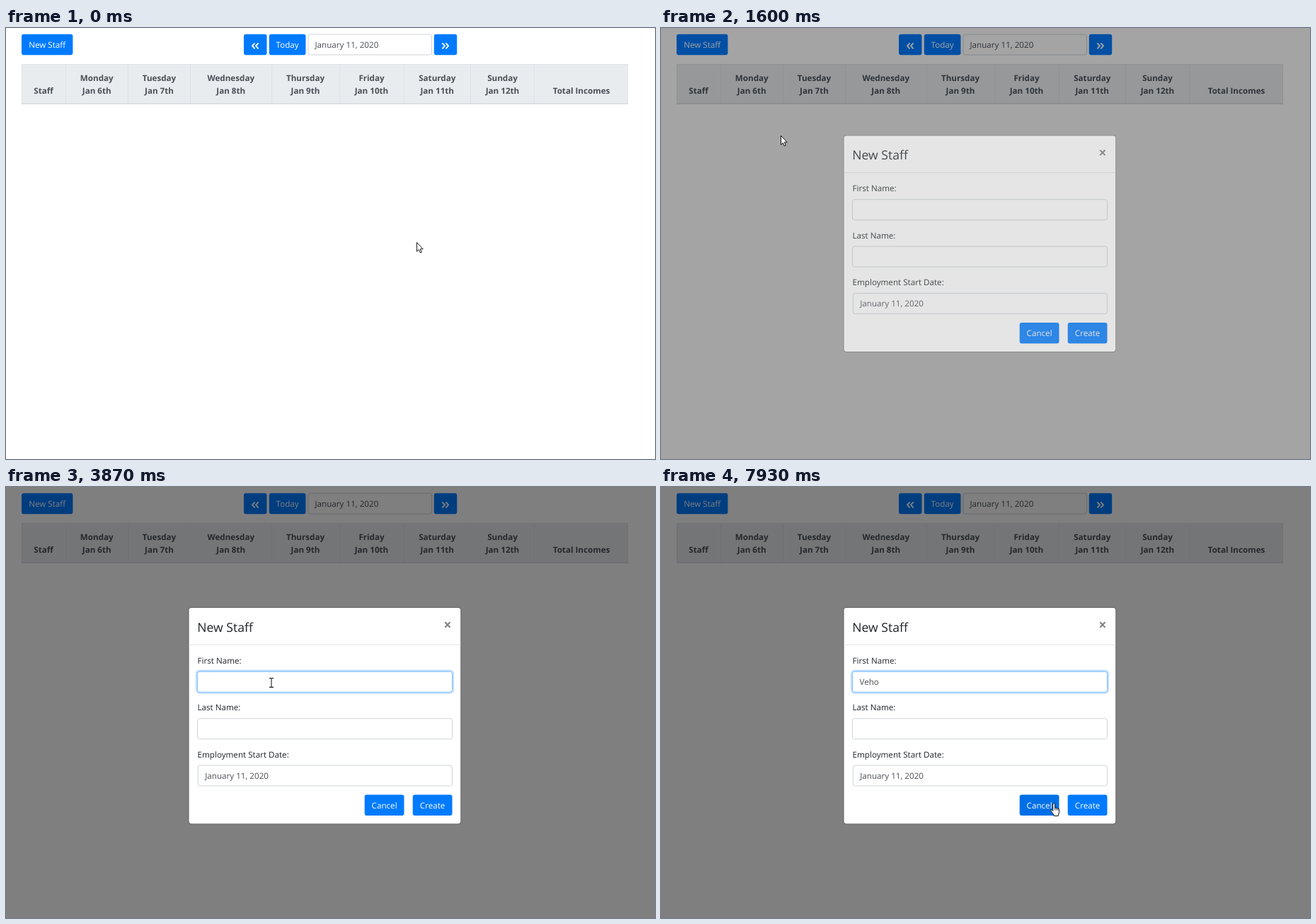
An HTML page that plays this animation: 917 px wide and 610 px high, repeating every 8000 ms.

```html
<!DOCTYPE html>
<html lang="en">
<head>
<meta charset="utf-8">
<title>Staff planner</title>
<style>
  html, body { margin: 0; width: 100%; height: 100%; overflow: hidden; background: #fff; }
  svg { display: block; width: 917px; height: 610px; }
  text { font: 11.65px "Open Sans", "Noto Sans", sans-serif; text-rendering: geometricPrecision; }
  .head { font-weight: 700; fill: #495057; text-anchor: middle; }
  .label { fill: #212529; }
  .title { font-size: 17.6px; fill: #212529; }
  .value { fill: #495057; }
  .btn { fill: #fff; text-anchor: middle; }
</style>
</head>
<body>
<svg id="stage" viewBox="0 0 917 610" xmlns="http://www.w3.org/2000/svg"></svg>
<script>
const LOOP = 8000, STEP = 1000 / 15;
const BLUE = [0, 123, 255], HOVER = [0, 105, 217], PRESSED = [0, 100, 210];
const NAME = 'Veho';
const KEY_TIMES = [5130, 5730, 5930, 6330];

const label = (cls, x, y, s) => `<text class="${cls}" x="${x}" y="${y}">${s}</text>`;

const button = (id, x, y, w, s = '') =>
  `<rect id="${id}" x="${x}" y="${y}" width="${w}" height="29.4" rx="3" fill="#007bff"/>` +
  label('btn', x + w / 2, y + 19.1, s);

const field = (id, x, y, w) =>
  `<rect id="${id}" x="${x}" y="${y}" width="${w}" height="29" rx="3" fill="#fff" stroke="#ced4da"/>`;

const chevrons = (x, dir) => [0, 5].map(d =>
  `<path d="M${x + dir * d} 21.3l${-dir * 3.6} 4 ${dir * 3.6} 4" fill="none" stroke="#fff" stroke-width="1.9"/>`).join('');

function header() {
  const edges = [22, 84, 172.5, 260.5, 375, 471, 562, 656.5, 746.5, 879];
  const days = ['Monday', 'Tuesday', 'Wednesday', 'Thursday', 'Friday', 'Saturday', 'Sunday'];
  let out = '<rect x="22" y="51" width="857" height="57" fill="#e9ecef"/>';
  for (const x of edges) {
    out += `<path d="M${Math.min(Math.floor(x), 878) + .5} 51V108" stroke="#dee2e6"/>`;
  }
  out += '<path d="M22 51.5H879" stroke="#dee2e6"/><path d="M22 107.3H879" stroke="#d6dbe0" stroke-width="1.4"/>';
  out += label('head', 53, 93.3, 'Staff') + label('head', 813, 93.3, 'Total Incomes');
  days.forEach((day, i) => {
    const x = (edges[i + 1] + edges[i + 2]) / 2;
    out += label('head', x, 75, day) + label('head', x, 93.3, `Jan ${i + 6}th`);
  });
  return out;
}

const toolbar = () =>
  button('newBtn', 22, 8.8, 72.4, 'New Staff') +
  button('prev', 336, 8.8, 32.5) + chevrons(351.6, 1) +
  button('today', 371.8, 8.8, 51.7, 'Today') +
  field('day', 427, 9, 174.5) + label('value', 436.5, 28, 'January 11, 2020') +
  button('next', 604.8, 8.8, 32.4) + chevrons(621.4, -1);

const dialog = () =>
  `<rect x="257.7" y="170.2" width="385.4" height="307" rx="4" fill="#000" fill-opacity=".3"/>
  <rect x="258.5" y="171" width="383.8" height="305.5" rx="3.4" fill="#fff"/>
  <path d="M258.5 223.3H642.3" stroke="#e4e7ea"/>
  <path d="M620.3 191.3l7.2 7.4m0-7.4l-7.2 7.4" stroke="#7f7f7f" stroke-width="2"/>` +
  label('title', 270.3, 204.5, 'New Staff') +
  label('label', 270.5, 250, 'First Name:') +
  label('label', 270.5, 316.4, 'Last Name:') +
  label('label', 270.5, 382.8, 'Employment Start Date:') +
  '<rect id="ring" x="269.2" y="259.9" width="362.6" height="31.6" rx="4.5" fill="none" stroke="#007bff" stroke-width="2.5"/>' +
  field('first', 270.5, 261.3, 360) + field('last', 270.5, 327.7, 360) + field('start', 271.3, 394, 359) +
  '<text id="typed" class="value" x="280.5" y="280"></text>' +
  '<rect id="caret" y="267" width="1" height="16" fill="#495057"/>' +
  label('value', 281.2, 413, 'January 11, 2020') +
  button('cancel', 506.7, 435.6, 55.8, 'Cancel') + button('create', 574.7, 435.6, 55.8, 'Create');

const pointers = () =>
  `<g id="arrow"><path d="M.5.5V13.2L3.4 10.5 5.3 15 7.3 14.2 5.4 9.8H9.2Z" fill="#fff" stroke="#000" stroke-width=".9"/></g>
  <g id="hand"><path d="M-1.2 11.5V2A1.4 1.4 0 0 1 1.6 2V7.2Q3 6.2 3.8 7.6 5.2 6.8 5.8 8.4 7.6 7.8 7.6 9.8V13Q7.6 15 6.4 16.4V18.5H0V16.8L-3.8 11.9Q-4.7 10-3.2 9.6-2.2 9.6-1.2 11.5Z" fill="#fff" stroke="#000" stroke-width=".9"/>
  <path d="M1.6 7V10.5M3.8 7.8V10.5M5.8 8.6V10.8" stroke="#000" stroke-width=".8"/></g>
  <g id="beam"><path d="M-3-6.4H-1Q0-6.4 0-5.4 0-6.4 1-6.4H3M-3 6.4H-1Q0 6.4 0 5.4 0 6.4 1 6.4H3M0-5.5V5.5" fill="none" stroke="#222" stroke-width="1.1"/></g>`;

const stage = document.getElementById('stage');
stage.innerHTML = '<rect width="917" height="610" fill="#fff"/>' + toolbar() + header() +
  '<rect id="shade" width="917" height="610"/>' +
  `<g id="modal">${dialog()}</g>` + pointers();

const el = {};
stage.querySelectorAll('[id]').forEach(n => el[n.id] = n);
const set = (id, name, v) => el[id].setAttribute(name, v);

const clamp = v => Math.max(0, Math.min(1, v));
const mix = (a, b, p) => `rgb(${a.map((v, i) => Math.round(v + (b[i] - v) * p))})`;

// Linear interpolation over rows of [time, ...values].
function track(rows, t) {
  if (t <= rows[0][0]) return rows[0].slice(1);
  for (let i = 1; i < rows.length; i++) {
    const a = rows[i - 1], b = rows[i];
    if (t <= b[0]) {
      const p = (t - a[0]) / (b[0] - a[0]);
      return a.slice(1).map((v, j) => v + (b[j + 1] - v) * p);
    }
  }
  return rows[rows.length - 1].slice(1);
}

// CSS ease-out, cubic-bezier(0, 0, .58, 1).
function easeOut(p) {
  let lo = 0, hi = 1;
  for (let i = 0; i < 20; i++) {
    const s = (lo + hi) / 2;
    if (1.74 * s * s - .74 * s ** 3 < p) lo = s; else hi = s;
  }
  return 3 * lo * lo - 2 * lo ** 3;
}

const MOUSE = [
  [0, 580, 303], [130, 566, 313], [270, 505, 285], [400, 400, 215], [530, 270, 130],
  [670, 140, 55], [730, 92, 34], [870, 63, 22], [1000, 65, 21], [1470, 65, 21],
  [1530, 108, 82], [1600, 169, 152], [1670, 231, 195], [1800, 325, 248], [1930, 368, 272],
  [2000, 375, 276.5], [7270, 375, 276.5], [7330, 379, 280], [7470, 405, 310], [7600, 465, 385],
  [7670, 500, 425], [7730, 528, 455], [7800, 545, 466], [7870, 553, 453], [7930, 555, 447]
];
const OPENING = [[1470, 6], [1600, 107], [1670, 173], [1800, 300]];

function caretOn(t) {
  if (t < 2270) return false;
  const tick = Math.floor((t - 2264) / (STEP * 8));
  const since = 2264 + tick * STEP * 8;
  return tick % 2 === 0 && t < 5100 ||
    KEY_TIMES.some(k => k <= t && k >= since) ||
    t >= 7070 && t < 7600;
}

function pointerKind(t, x, y) {
  if (t < 1470) return x > 22 && x < 94 && y > 9 && y < 38 ? 'hand' : 'arrow';
  if (t > 1730 && x > 270 && x < 631 && (y > 261 && y < 291 || y > 327 && y < 357 || y > 394 && y < 423)) return 'beam';
  return t > 7800 && y < 465 ? 'hand' : 'arrow';
}

function render(ms) {
  const t = Math.round(Math.floor((ms % LOOP + 4) / STEP) % 120 * STEP / 10) * 10;

  const [x, y] = track(MOUSE, t);
  const kind = pointerKind(t, x, y);
  for (const id of ['arrow', 'hand', 'beam']) set(id, 'visibility', id === kind ? 'visible' : 'hidden');
  set(kind, 'transform', `translate(${Math.round(x)} ${Math.round(y)})`);

  const hover = clamp((t - 700) / 150) * (1 - clamp((t - 1470) / 120));
  set('newBtn', 'fill', mix(BLUE, t < 1470 ? HOVER : PRESSED, hover));
  set('cancel', 'fill', mix(BLUE, HOVER, clamp((t - 7830) / 150)));

  const open = t < 1470 ? 0 : track(OPENING, t)[0];
  const fade = clamp(open / 150);
  set('shade', 'opacity', fade / 2);
  set('modal', 'opacity', fade);
  set('modal', 'transform', `translate(0 ${-38.5 * (1 - easeOut(clamp(open / 300)))})`);

  const focus = clamp((t - 2220) / 200);
  set('ring', 'opacity', t < 2270 ? 0 : focus * .25);
  set('first', 'stroke', mix([206, 212, 218], [128, 189, 255], t < 2270 ? 0 : focus));

  el.typed.textContent = NAME.slice(0, KEY_TIMES.filter(k => k <= t).length);
  const width = el.typed.textContent ? el.typed.getComputedTextLength() : 0;
  set('caret', 'x', 280 + Math.round(width));
  set('caret', 'visibility', caretOn(t) ? 'visible' : 'hidden');
}

const begin = performance.now();
function loop() {
  render(performance.now() - begin);
  requestAnimationFrame(loop);
}
loop();
</script>
</body>
</html>
```
